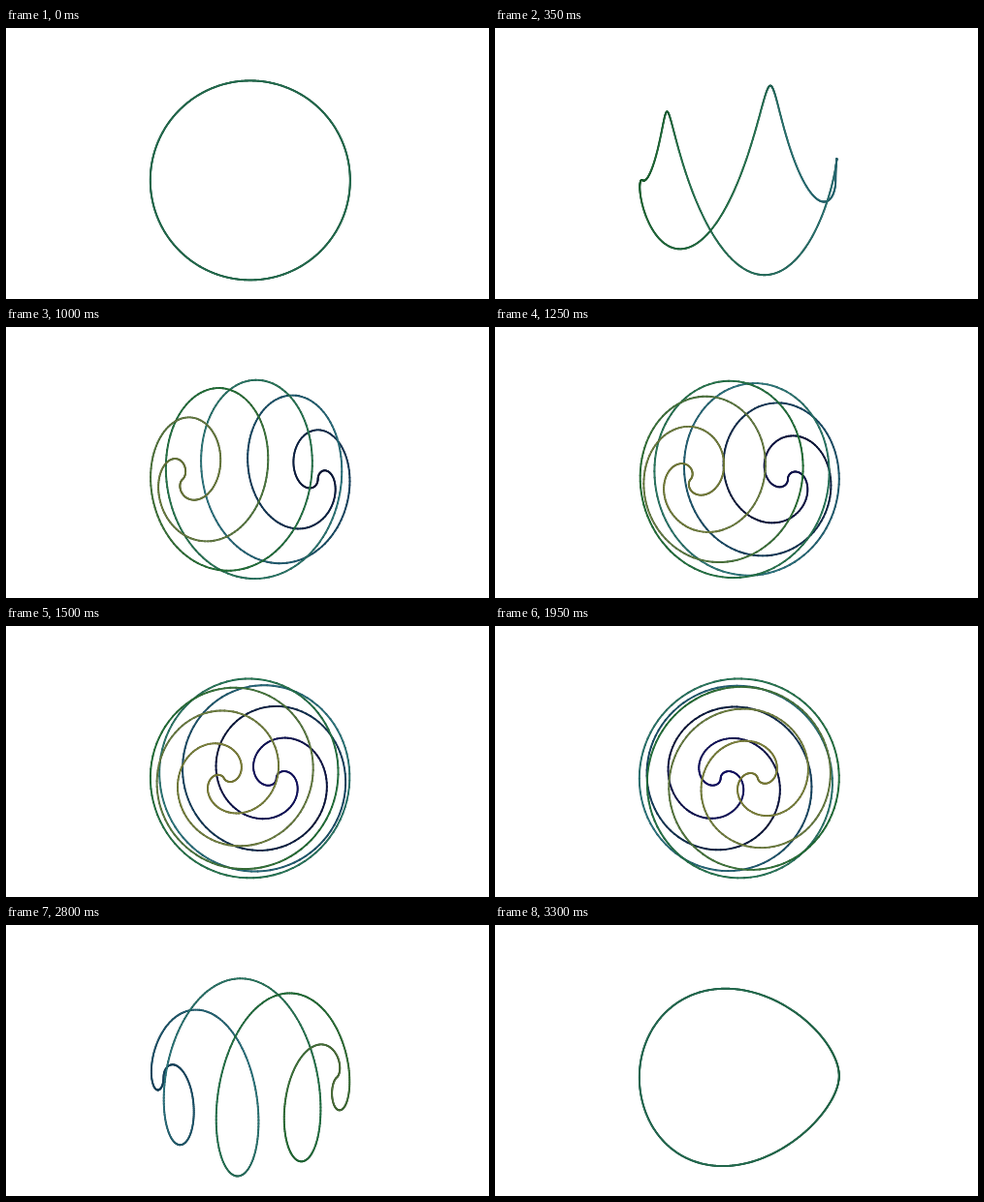
Write an HTML page with a canvas that moves like this. It is 498x280 px and loops after 3350 ms.

```html
<!DOCTYPE html>
<html lang="en">
<head>
<meta charset="utf-8">
<title>Twisted circle</title>
<style>
html, body { margin: 0; width: 100%; height: 100%; overflow: hidden; background: #fff; }
canvas { display: block; }
</style>
</head>
<body>
<canvas id="stage" width="498" height="280"></canvas>
<script>
const ctx = document.getElementById('stage').getContext('2d');
const CX = 251.8, CY = 157.4, R = 103;
const STEP = 50, FRAMES = 67, SEGMENTS = 720, MAX_TWIST = 8.05;

// Tube colour along the axis, from far pole to near pole
const RAMP = [
  [-1, 22, 18, 120], [-0.75, 10, 22, 62], [-0.5, 24, 78, 108], [-0.25, 46, 124, 136],
  [0, 42, 126, 92], [0.3, 34, 118, 56], [0.55, 104, 130, 70], [1, 142, 142, 60]
];

function ramp(v) {
  let i = 1;
  while (i < RAMP.length - 1 && v > RAMP[i][0]) i++;
  const a = RAMP[i - 1], b = RAMP[i];
  const f = Math.min(1, Math.max(0, (v - a[0]) / (b[0] - a[0])));
  return [1, 2, 3].map(j => a[j] + (b[j] - a[j]) * f);
}

const css = (rgb, k) => `rgb(${rgb.map(c => Math.round(c * k)).join()})`;

// Great circle twisted about its axis, the axis turning about the vertical
function point(psi, twist, turn) {
  const lon = twist * Math.abs(psi);
  const z = -Math.cos(psi);
  const up = Math.sin(psi) * Math.cos(lon);
  const side = Math.sin(psi) * Math.sin(lon);
  const s = Math.sin(turn), c = Math.cos(turn);
  return {
    x: CX + R * (side * c - z * s),
    y: CY - R * up,
    depth: side * s + z * c,
    tone: z * c
  };
}

function stroke(a, b, width, color) {
  ctx.lineWidth = width;
  ctx.strokeStyle = color;
  ctx.beginPath();
  ctx.moveTo(a.x, a.y);
  ctx.lineTo(b.x, b.y);
  ctx.stroke();
}

function draw(frame) {
  // The turn starts slowly, the twist lags towards the end
  const x = frame / 66.7;
  const twist = MAX_TWIST * Math.sin(Math.PI * (x - 0.2 * x * x * (1 - x)));
  const turn = Math.PI * (0.5 - x + 0.25 * x * (1 - x) * (1 - x));

  const pts = [];
  for (let i = 0; i <= SEGMENTS; i++) {
    pts.push(point(Math.PI * (2 * i / SEGMENTS - 1), twist, turn));
  }
  const parts = pts.slice(1).map((b, i) => ({ a: pts[i], b }));
  parts.sort((p, q) => p.a.depth - q.a.depth);

  ctx.fillStyle = '#fff';
  ctx.fillRect(0, 0, 498, 280);
  ctx.lineCap = 'round';
  for (const { a, b } of parts) {
    const rgb = ramp(a.tone);
    stroke(a, b, 1.9, css(rgb, 0.72));
    stroke(a, b, 0.8, css(rgb, 1.1));
  }
}

let shown = -1;
function tick(now) {
  const frame = Math.floor(now / STEP) % FRAMES;
  if (frame !== shown) draw(shown = frame);
  requestAnimationFrame(tick);
}
draw(0);
requestAnimationFrame(tick);
</script>
</body>
</html>
```
